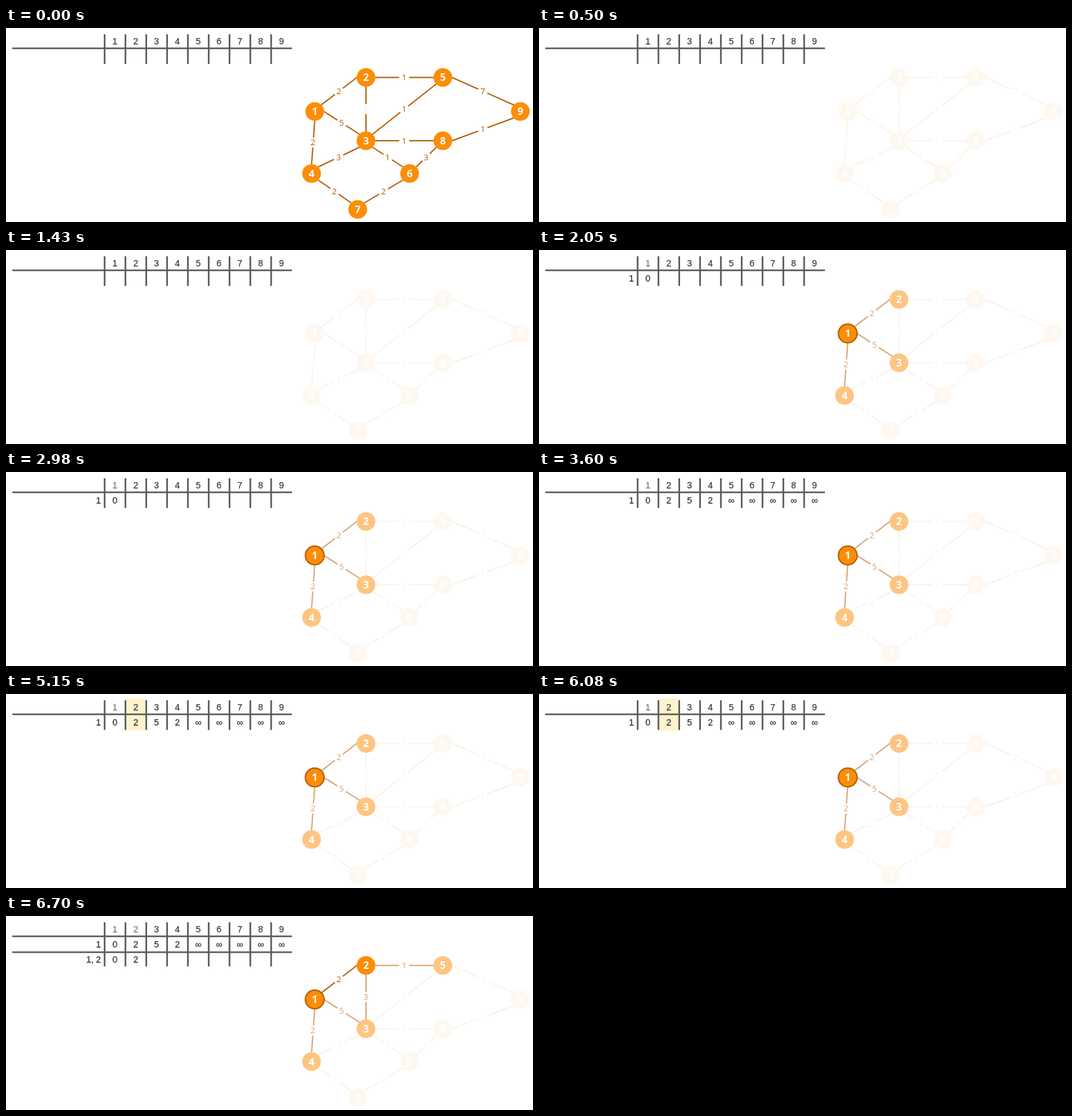
Recreate the animation shown at these times as an HTML page. Size 833 px wide and 308 px high, loop 8 s.

```html
<!DOCTYPE html>
<html lang="en">
<head>
<meta charset="utf-8">
<title>Shortest paths</title>
<style>
html, body { margin: 0; width: 100%; height: 100%; overflow: hidden; background: #fff; }
svg { display: block; width: 833px; height: 308px; }
text { text-anchor: middle; }
.cell { font: 14px "Liberation Sans", Arial, sans-serif; stroke: currentColor; stroke-width: .25px; }
.label { text-anchor: end; }
.node { font: bold 16px "Open Sans", "Noto Sans", sans-serif; }
.weight { font: 13.5px "Open Sans", "Noto Sans", sans-serif; }
</style>
</head>
<body>
<svg id="stage" viewBox="0 0 833 308"></svg>
<script>
const stage = document.getElementById('stage');

// Colours by emphasis: 0 faint, 1 reachable, 2 full
const FILL = ['#fff8f0', '#fec582', '#fd8d06'];
const LINE = ['#f9f3ec', '#d6a574', '#b45f06'];
const RULE = '#595959';
const RADIUS = 14.8;

const NODES = {
  1: [488, 132.5], 2: [569, 78.5], 3: [569, 179], 4: [483, 231], 5: [690.5, 78.5],
  6: [638, 231], 7: [556, 288], 8: [690.5, 179], 9: [813, 132.5]
};

// Each edge: node and port, node and port, weight
const EDGES = `1NE 2W 2, 1E 3NW 5, 1S 4N 2, 2E 5W 1, 2S 3N 3, 3NE 5SW 1, 3E 8W 1,
  3SW 4NE 3, 3SE 6NW 1, 6NE 8SW 3, 6SW 7NE 2, 4SE 7NW 2, 5E 9NW 7, 8E 9SW 1`
  .split(',').map(edge => {
    const [a, b, weight] = edge.trim().split(' ');
    return { a: +a[0], b: +b[0], from: port(a), to: port(b), weight };
  });

const ROW = '0252∞∞∞∞∞';
const STEPS = [
  { at: 0, plain: true },
  { at: 500 },
  { at: 2050, done: 1, rows: ['0'] },
  { at: 3600, done: 1, rows: [ROW] },
  { at: 5150, done: 1, rows: [ROW], pick: 2 },
  { at: 6700, done: 2, rows: [ROW, '02'] }
];

const colX = i => 155.9 + i * 32.9;
const ruleY = i => 32.3 + i * 25.2;

// Point on a node's rim in a compass direction
function port(name) {
  const [x, y] = NODES[name[0]];
  const dx = name.includes('E') - name.includes('W');
  const dy = name.includes('S') - name.includes('N');
  const r = 14.5 / Math.hypot(dx, dy);
  return [x + dx * r, y + dy * r];
}

function line(from, to, color, width) {
  return `<path d="M${from}L${to}" stroke="${color}" stroke-width="${width}"/>`;
}

function text(cls, x, y, s, color) {
  return `<text class="${cls}" x="${x}" y="${y}" fill="${color}" color="${color}">${s}</text>`;
}

function table({ rows = [], done = 0, pick }) {
  const bottom = rows.length > 1 ? 80 : 57;
  let out = pick ? `<rect x="${colX(pick - 1)}" y="7" width="32.5" height="51" fill="#fff2cc"/>` : '';
  for (let i = 0; i < 9; i++) {
    out += line([colX(i), 10], [colX(i), bottom], RULE, 2.6);
    out += text('cell', colX(i) + 16.3, 26, i + 1, i < done ? '#7f7f7f' : '#3c3c3c');
  }
  for (let i = 0; i < Math.max(1, rows.length); i++)
    out += line([10, ruleY(i)], [452, ruleY(i)], RULE, 2.6);
  rows.forEach((values, r) => {
    const y = 50 + r * 24;
    out += text('cell label', 150, y, r ? '1, 2' : '1', '#333');
    [...values].forEach((v, i) => out += text('cell', colX(i) + 16.3, y, v, '#333'));
  });
  return out;
}

function graph({ done = 0, plain }) {
  // An edge is as strong as the number of its ends already visited
  const edgeLevel = ({ a, b }) => plain ? 2 : (a <= done) + (b <= done);
  const nodeLevel = n => plain || n <= done ? 2 :
    +EDGES.some(e => edgeLevel(e) && (e.a === n || e.b === n));
  let out = '';
  for (const edge of EDGES) {
    const { a, b, from, to, weight } = edge;
    const color = LINE[edgeLevel(edge)];
    const x = (from[0] + to[0]) / 2 - .3, y = (from[1] + to[1]) / 2;
    const hidden = plain && a === 2 && b === 3;
    out += line(from, to, color, 2);
    out += `<circle cx="${x}" cy="${y}" r="8" fill="#fff"/>`;
    out += text('weight', x, y + 4.6, weight, hidden ? '#f7ebdf' : color);
  }
  for (const [key, [x, y]] of Object.entries(NODES)) {
    const ring = key === '1' && done ? `stroke="${LINE[2]}" stroke-width="2.2"` : '';
    out += `<circle cx="${x}" cy="${y}" r="${RADIUS}" fill="${FILL[nodeLevel(+key)]}" ${ring}/>`;
    out += text('node', x, y + 5.5, key, '#fff');
  }
  return out;
}

const start = performance.now();
let shown;
function tick() {
  const t = (performance.now() - start) % 8000;
  const step = STEPS.findLast(s => s.at <= t);
  if (step !== shown) {
    shown = step;
    stage.innerHTML = table(step) + graph(step);
  }
  requestAnimationFrame(tick);
}
tick();
</script>
</body>
</html>
```
